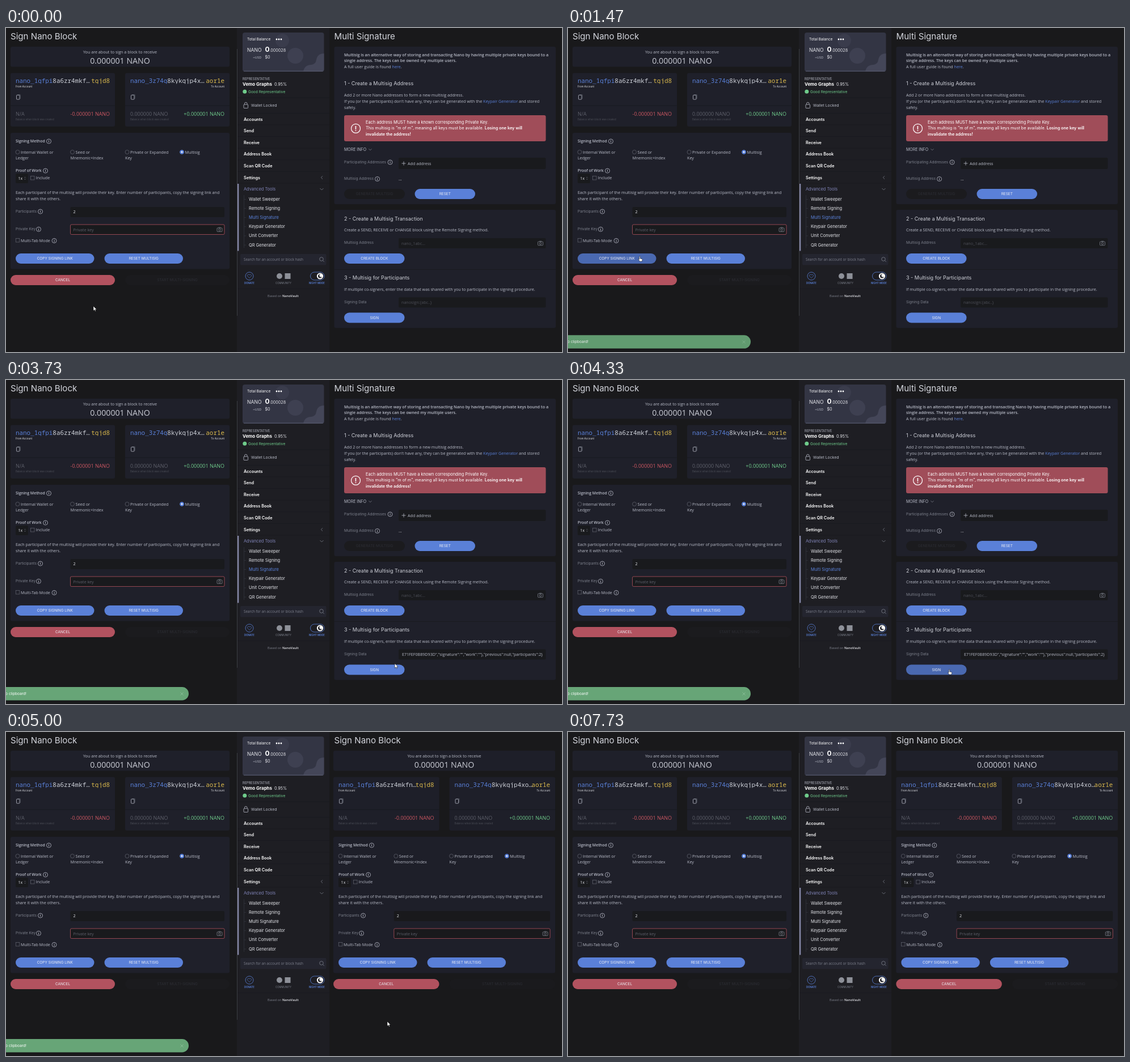
An HTML page that plays this animation: 980x572 px, repeating every 8000 ms.

```html
<!DOCTYPE html>
<html lang="en">
<head>
<meta charset="utf-8">
<title>Multisig signing</title>
<style>
html, body { margin: 0; width: 100%; height: 100%; overflow: hidden; background: #19191b; }
svg { display: block; }
text { font-family: Inter, sans-serif; white-space: pre; }
.o { font-family: "Open Sans", sans-serif; }
.m { font-family: "Noto Sans Mono", monospace; }
.b { font-weight: 600; }
.mid { text-anchor: middle; }
.end { text-anchor: end; }
.on { filter: brightness(.82); }
</style>
</head>
<body>
<svg id="stage" width="980" height="572" viewBox="0 0 980 572"></svg>
<script>
const PANEL = '#1f202a', FIELD = '#191a1d', SIDE = '#1e1e23', LINE = '#191a20';
const BLUE = '#5a80d8', RED = '#b2525f', GREEN = '#6fcb8b', YELLOW = '#d9b84c';
const LIGHT = '#e4e5ea', BODY = '#b9bcc8', GRAY = '#7d808c', MUTED = '#5d5f6a', DIM = '#4d4f58', OFF = '#2d2e35';

const rect = (x, y, w, h, fill, r = 0, extra = '') =>
  `<rect x="${x}" y="${y}" width="${w}" height="${h}" fill="${fill}" rx="${r}" ${extra}/>`;
const circle = (x, y, r, fill, extra = '') => `<circle cx="${x}" cy="${y}" r="${r}" fill="${fill}" ${extra}/>`;
const stroke = (d, color, width = .8) => `<path d="${d}" fill="none" stroke="${color}" stroke-width="${width}"/>`;
const text = (x, y, str, size, fill, cls = '', extra = '') =>
  `<text x="${x}" y="${y}" font-size="${size}" fill="${fill}" class="${cls}" ${extra}>${str}</text>`;
const body = (x, y, str, fill = BODY, cls = '') => text(x, y, str, 7.17, fill, 'o ' + cls);
const span = (str, fill) => `<tspan fill="${fill}">${str}</tspan>`;
const outline = color => `stroke="${color}" stroke-width=".8"`;

const info = (x, y) => circle(x, y, 4, 'none', outline(BODY)) + text(x, y + 2.3, 'i', 6.3, BODY, 'b mid');
const camera = (x, y) => rect(x - 4.5, y - 3, 9, 6.5, 'none', 1, outline(GRAY)) +
  circle(x, y + .3, 1.8, 'none', outline(GRAY)) + stroke(`M${x - 2} ${y - 3.8}h4`, GRAY);
const checkbox = (x, y) => rect(x, y, 6.5, 6.5, 'none', 0, outline(MUTED));
const label = (x, y, str) => text(x, y, str, 6.6, GRAY);
const field = (x, y, w, h = 18, extra = '') => rect(x, y, w, h, FIELD, 2, extra);
const button = (x, y, w, str, fill = BLUE) => rect(x, y, w, 18, fill, 9, 'class="hot"') +
  text(x + w / 2, y + 11.3, str, 6.45, '#eceef5', 'mid');
const disabled = (x, y, w, str) => rect(x, y, w, 18, '#1b1b1e', 9) +
  text(x + w / 2, y + 11.3, str, 6.45, OFF, 'mid');

function accountCard(x, w, head, mid, tail, caption, balance, delta, isFrom) {
  const right = x + w - 9;
  return rect(x, 79.5, w, 94.5, PANEL, 3) +
    `<g clip-path="url(#line)">` +
    text(x + 9, 97, span(head, BLUE) + mid + '…', 10.9, '#cdd0d8', 'm') +
    text(right, 97, tail, 10.9, YELLOW, 'm end') + '</g>' +
    text(isFrom ? x + 9 : right, 104.8, caption, 4.4, LIGHT, isFrom ? '' : 'end') +
    rect(x + 10.5, 118.5, 5.5, 7.5, 'none', .8, outline(BODY)) +
    stroke(`M${x + 12} 117.8h5.2v7`, GRAY, .5) +
    rect(x, 136.5, w, 1, LINE) +
    text(x + 9, 155, balance, 8.95, MUTED, 'o') +
    text(right, 155, delta, 8.95, isFrom ? '#cc5762' : GREEN, 'o end') +
    text(x + 9, 163.3, 'Balance when block was created', 4.35, DIM);
}

function signForm(w, mid1, mid2) {
  const half = (w - 18) / 2, col = i => 9 + i * w / 4, inner = w - 18 - w / 4;
  const methods = [['Internal Wallet or', 'Ledger'], ['Seed or', 'Mnemonic+Index'],
    ['Private or Expanded', 'Key'], ['Multisig', '']];
  return rect(0, 33, w, 35.5, PANEL, 3) +
    body(w / 2, 44.5, 'You are about to sign a block to receive', BODY, 'mid') +
    text(w / 2, 63, '0.000001 NANO', 14.2, '#c9cbd4', 'o mid') +
    accountCard(0, half, 'nano_1gfpi', mid1, 'tgjd8', 'From Account', 'N/A', '-0.000001 NANO', true) +
    accountCard(half + 18, half, 'nano_3z74q', mid2, 'aor1e', 'To Account', '0.000000 NANO', '+0.000001 NANO', false) +
    rect(0, 185, w, 240.5, PANEL, 3) +
    text(9, 202, 'Signing Method', 6.9, BODY, 'o b') + info(67.5, 200) +
    methods.map(([first, second], i) => {
      const x = col(i), on = i === 3;
      return circle(x + 3.5, 219, 3.5, on ? BLUE : 'none', outline(on ? BLUE : MUTED)) +
        (on ? circle(x + 3.5, 219, 1.4, '#fff') : '') +
        body(x + 9, 221.6, first) + body(x, 232.4, second);
    }).join('') +
    text(9, 254, 'Proof of Work', 6.9, BODY, 'o b') + info(61.5, 252) +
    field(9, 257, 22, 17) + body(13.5, 268, '1x', LIGHT) +
    stroke('M24.3 264.3l1.2-1.3 1.2 1.3M24.3 266.2l1.2 1.3 1.2-1.3', GRAY, .6) +
    checkbox(35.5, 261.5) + body(44.8, 267.4, 'Include') +
    body(9, 293, 'Each participant of the multisig will provide their key. Enter number of participants, copy the signing link and') +
    body(9, 303.7, 'share it with the others.') +
    label(9, 325.5, 'Participants') + info(52.5, 324) +
    field(col(1), 316, inner) + body(col(1) + 5, 327.3, '2', LIGHT) +
    label(9, 357, 'Private Key') + info(49.5, 355.3) +
    field(col(1), 347, inner, 17.5, outline(RED)) + body(col(1) + 5, 358.6, 'Private key', MUTED) +
    camera(w - 17.5, 356) +
    checkbox(9.3, 371.5) + body(18, 377.5, 'Multi-Tab Mode') + info(77, 375.5) +
    button(9, 398, 138.5, 'COPY SIGNING LINK') + button(165.5, 398, 138.5, 'RESET MULTISIG') +
    button(0, 436, half, 'CANCEL', RED) + disabled(half + 18, 436, half, 'START MULTI-SIGNING');
}

function multisigPage() {
  const heading = (y, str) => text(596, y, str, 9, '#cfd1d9');
  return rect(578.5, 33, 390.5, 278, PANEL, 3) +
    body(596, 49.5, 'Multisig is an alternative way of storing and transacting Nano by having multiple private keys bound to a', BODY, 'b') +
    body(596, 60.3, 'single address. The keys can be owned my multiple users.', BODY, 'b') +
    body(596, 71, `A full user guide is found ${span('here', BLUE)}.`) +
    heading(101, '1 - Create a Multisig Address') +
    body(596, 121, 'Add 2 or more Nano addresses to form a new multisig address.') +
    body(596, 132, `If you (or the participants) don't have any, they can be generated with the ${span('Keypair Generator', BLUE)} and stored`) +
    body(596, 142.7, 'safely.') +
    rect(596, 154, 355.5, 46, '#a04d59', 3) +
    circle(616.5, 177.3, 8, 'none', 'stroke="#fff" stroke-width="1.2"') + text(616.5, 181.6, '!', 12, '#fff', 'b mid') +
    text(634, 168.8, 'Each address MUST have a known corresponding Private Key.', 7.35, '#fff') +
    text(634, 179.4, 'This multisig is "m of m", meaning all keys must be available. <tspan class="b">Losing one key will</tspan>', 7.25, '#fff') +
    text(634, 190, 'invalidate the address!', 7.3, '#fff', 'b') +
    text(596, 217, 'MORE INFO', 7, BODY) + stroke('M639.5 213.3l2.5 2.5 2.5-2.5', GRAY) +
    label(596, 239, 'Participating Addresses') + info(677, 237) +
    field(692, 229, 259.5, 20) + stroke('M697.5 239h7M701 235.5v7', BODY) + body(708, 241.6, 'Add address') +
    label(596, 268.3, 'Multisig Address') + info(654.5, 266.5) + body(692, 268.6, '...', LIGHT) +
    disabled(596, 284, 107, 'GENERATE MULTISIG') + button(720.5, 284, 106.5, 'RESET') +
    rect(578.5, 321, 390.5, 208.5, PANEL, 3) + rect(578.5, 426, 390.5, 1, LINE) +
    heading(339.5, '2 - Create a Multisig Transaction') +
    body(596, 359.2, 'Create a SEND, RECEIVE or CHANGE block using the Remote Signing method.') +
    label(596, 381, 'Multisig Address') + field(692, 371, 259.5) + body(697, 382.6, 'nano_1abc...', DIM) + camera(942, 380.2) +
    button(596, 398, 106.5, 'CREATE BLOCK') +
    heading(444, '3 - Multisig for Participants') +
    body(596, 464, 'If multiple co-signers, enter the data that was shared with you to participate in the signing procedure.') +
    label(596, 485.5, 'Signing Data') + field(692, 475.5, 259.5, 18, 'id="dataField"') +
    `<g id="hint">${body(697, 487, 'nanosign:{abc..}', DIM)}</g>` +
    `<g id="data">${body(946, 487, 'E71FEF0B89D93D","signature":"","work":""},"previous":null,"participants":2}', BODY, 'end')}</g>` +
    button(596, 502.5, 106.5, 'SIGN');
}

function sidebar() {
  const menu = ['Accounts', 'Send', 'Receive', 'Address Book', 'Scan QR Code', 'Settings'];
  const tools = ['Wallet Sweeper', 'Remote Signing', 'Multi Signature', 'Keypair Generator', 'Unit Converter', 'QR Generator'];
  return rect(407, 0, 163, 572, SIDE) + rect(407, 37, 1, 471, '#3c3d43') +
    rect(417, 8, 143.5, 69, '#333544', 4) +
    circle(510, 49, 14, '#3e4051') + circle(487, 22, 12, '#3a3c4c') +
    '<path d="M524 77q2-12 14-12 8-1 9-9 2-11 13.5-11V73a4 4 0 0 1-4 4Z" fill="#444658"/>' +
    rect(419, 75.6, 139.5, 1.2, '#535669', .6) +
    text(425, 22, 'Total Balance', 6.5, '#fff') + [477, 481, 485].map(x => circle(x, 20, 1.4, '#fff')).join('') +
    text(425, 42, 'NANO', 8.6, LIGHT) + text(456.5, 42, '0', 12, '#fff', '', 'font-weight="700"') + text(464.3, 42, '.000028', 7.2, LIGHT) +
    text(450, 54, '~USD', 5.3, BODY, 'end') + text(456.5, 54.3, '$0', 7.2, LIGHT) +
    text(417, 92, 'REPRESENTATIVE', 5.7, BODY) +
    text(417, 101.8, 'Vemo Graphs', 7.9, '#fff', '', 'font-weight="700"') + text(473, 101.8, '0.95%', 7.2, LIGHT) +
    circle(420.8, 112.3, 3.5, GREEN) + text(427, 114.7, 'Good Representative', 6.6, GREEN) +
    rect(408, 122.5, 162, 1, LINE) +
    rect(419, 135, 7.5, 6.5, 'none', .8, outline(BODY)) + stroke('M420.5 135v-1.5a2.2 2.2 0 0 1 4.5 0v1.5', BODY) +
    text(432, 139, 'Wallet Locked', 6.85, BODY) +
    menu.map((name, i) => rect(408, 150 + i * 20.6, 162, 1, LINE) + text(419, 163.5 + i * 20.6, name, 7.3, '#fff', 'b')).join('') +
    stroke('M558 261.3l-2.7 2.7 2.7 2.7', GRAY) + rect(408, 273.6, 162, 1, LINE) +
    rect(408, 275, 2.3, 118.5, '#8587a6') + text(419, 287, 'Advanced Tools', 7.4, '#8084b8') +
    stroke('M553.5 283l3 3 3-3', GRAY) + rect(419, 295, .7, 93, '#33353f') +
    tools.map((name, i) => rect(419, 302 + i * 16.15, 4, .7, '#33353f') +
      text(428, 304.8 + i * 16.15, name, 7.45, LIGHT, '', i === 2 ? 'id="current"' : '')).join('') +
    rect(413, 399, 151.5, 19.5, '#24252f', 2) + text(419, 411, 'Search for an account or block hash', 6.3, GRAY, 'o') +
    circle(556, 408, 3.3, 'none', outline(GRAY)) + stroke('M558.3 410.3l2.5 2.5', GRAY) +
    circle(429, 438, 7, 'none', outline(BLUE)) +
    stroke('M429 441.5l-3.3-3.4a1.9 1.9 0 0 1 3.3-2.1 1.9 1.9 0 0 1 3.3 2.1Z', BLUE, .6) +
    circle(482, 438, 5, '#8d9098') + rect(491.5, 433, 10, 10, '#8d9098') +
    rect(536.5, 431, 24.5, 14, 'none', 7, outline(BLUE)) +
    circle(553.5, 438, 5.6, '#fff') + circle(553.5, 438, 3.5, SIDE) + circle(555.2, 437, 2.8, '#fff') +
    text(429, 451.5, 'DONATE', 4.3, BLUE, 'b mid') + text(489, 451.5, 'COMMUNITY', 4.4, GRAY, 'mid') +
    text(548, 451.5, 'NIGHT MODE', 4.3, BLUE, 'b mid') +
    rect(408, 460, 162, 1, LINE) +
    text(461, 474.5, `Based on <tspan class="b" fill="${LIGHT}">NanoVault</tspan>`, 5.65, GRAY, 'o');
}

const stage = document.getElementById('stage');
stage.innerHTML =
  `<clipPath id="line"><rect x="0" y="84" width="980" height="14.5"/></clipPath>
  <clipPath id="rightPane"><rect x="570" y="0" width="410" height="572"/></clipPath>` +
  text(8, 20, 'Sign Nano Block', 15.1, '#d3d5dc') + `<g transform="translate(8)">${signForm(386, '8a6zr4mkf', '8kykqjp4x')}</g>` +
  `<g clip-path="url(#rightPane)"><text id="title" x="578.5" y="20" font-size="15.1" fill="#d3d5dc"></text>
  <g id="multi">${multisigPage()}</g><g id="sign">${signForm(391, '8a6zr4mkfn', '8kykqjp4xo')}</g></g>` +
  sidebar() +
  `<g id="toast">${rect(-20, 542, 342, 23.5, '#67a577', 11.7)}${text(36, 556.2, 'Signing link copied to clipboard!', 6.6, '#fff', 'end')}
  ${stroke('M307.5 551.5l5 5m0-5l-5 5', '#8fc29c')}</g>
  <g id="cursor">
    <path id="arrow" d="M0 0V8.2L2 6.5 3.3 9.2 4.5 8.6 3.2 6H5.8Z" fill="#fff" stroke="#000" stroke-width=".5"/>
    <path id="hand" d="M-.8 .8a.8 .8 0 0 1 1.6 0V4l3 .7q1 .3 .8 1.5L3.8 9H0L-2.5 5.6q0-1 1-.6l.7 .7z" fill="#fff" stroke="#000" stroke-width=".5"/>
    <path id="beam" d="M-1.5-4.5h3M0-4.5v9M-1.5 4.5h3" fill="none" stroke="#ddd" stroke-width=".9"/>
  </g>`;

const $ = id => document.getElementById(id);
const show = (id, on) => $(id).setAttribute('display', on ? 'inline' : 'none');
const clamp = v => Math.min(1, Math.max(0, v));
const hotspots = [...document.querySelectorAll('.hot')];
const inside = (el, x, y) => {
  if (el.closest('[display="none"]')) return false;
  const b = el.getBoundingClientRect();
  return x >= b.left && x < b.right && y >= b.top && y < b.bottom;
};

// Pointer stops: time, x, y
const stops = [[0, 154, 491], [70, 154, 491], [670, 126.5, 403], [1800, 126.5, 403], [2600, 725, 482],
  [3200, 725, 482], [4000, 671, 507], [4200, 671, 507], [4330, 672, 511], [5270, 672, 511], [5330, 672.6, 511],
  [5530, 672.6, 511], [5930, 688.5, 498.5], [6070, 688.5, 498.5], [6470, 937, 391], [8000, 937, 391]];

function pointer(t) {
  const i = stops.findIndex((s, k) => k && t <= s[0]);
  const [t0, x0, y0] = stops[i - 1], [t1, x1, y1] = stops[i];
  const p = (t - t0) / (t1 - t0), e = p * p * (3 - 2 * p);
  return [x0 + (x1 - x0) * e, y0 + (y1 - y0) * e];
}

const PASTE = 2740, SWAP = 4536;

function render(t) {
  const swapped = t >= SWAP;
  $('title').textContent = swapped ? 'Sign Nano Block' : 'Multi Signature';
  $('current').setAttribute('fill', swapped ? LIGHT : BLUE);
  show('multi', !swapped);
  show('sign', swapped);
  show('hint', t < PASTE);
  show('data', t >= PASTE);

  const slide = Math.sin(clamp((t - SWAP) / 490) * Math.PI / 2);
  $('sign').setAttribute('transform', `translate(${578.3 - 391 * (1 - slide)})`);
  $('sign').setAttribute('opacity', slide);

  const shown = clamp((t - 1080) / 420) * (1 - clamp((t - 6060) / 400));
  $('toast').setAttribute('opacity', shown);
  $('toast').setAttribute('transform', `translate(0 ${4.5 * (1 - shown)})`);

  const [x, y] = pointer(t);
  const visible = t < 6450;
  const hovered = visible && hotspots.find(el => inside(el, x, y));
  const typing = inside($('dataField'), x, y);
  hotspots.forEach(el => el.classList.toggle('on', el === hovered));
  $('cursor').setAttribute('transform', `translate(${x} ${y})`);
  show('cursor', visible);
  show('hand', hovered);
  show('beam', typing);
  show('arrow', !hovered && !typing);
}

(function tick() {
  render(performance.now() % 8000);
  requestAnimationFrame(tick);
})();
</script>
</body>
</html>
```
